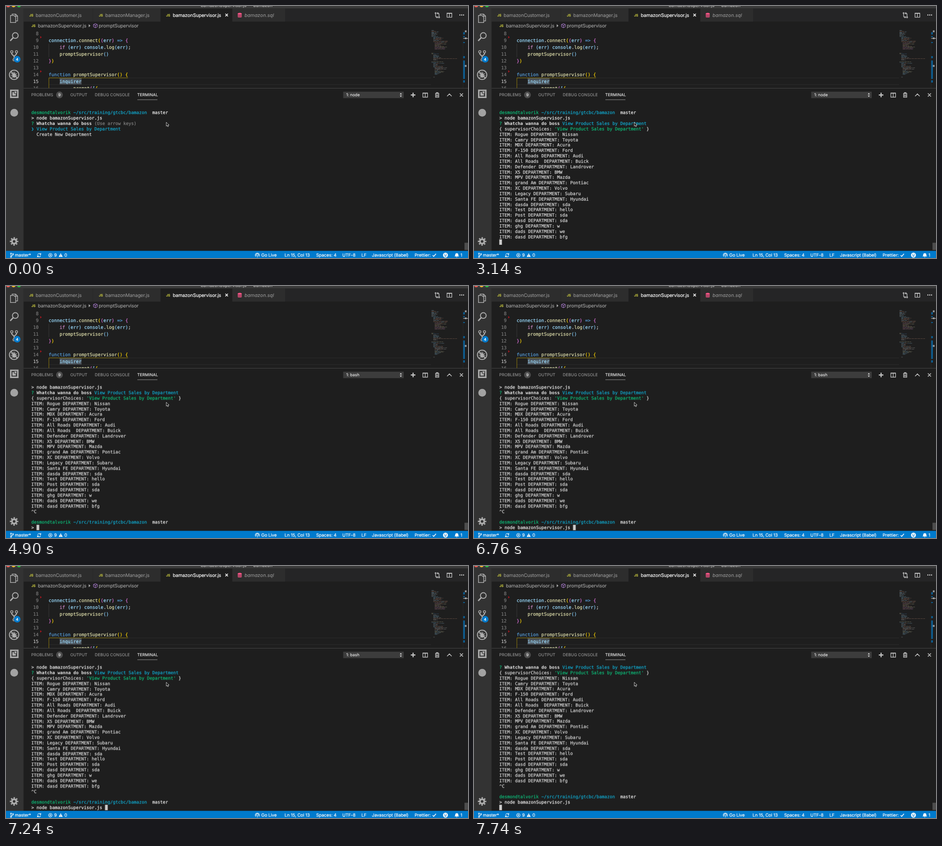
Write an HTML page that moves like this. It is 1013 px wide and 553 px high and loops after 8 s.

```html
<!DOCTYPE html>
<html lang="en">
<head>
<meta charset="utf-8">
<title>Terminal session</title>
<style>
html, body { margin: 0; width: 100%; height: 100%; overflow: hidden; background: #1e1e1e; }
svg { display: block; width: 100vw; height: 100vh; }
text { white-space: pre; text-rendering: geometricPrecision; color: #ccc; stroke-width: .1px; }
text, tspan { fill: currentColor; stroke: currentColor; }
.ui text { font: 10.4px Inter, "Liberation Sans", sans-serif; letter-spacing: -.14px; }
.ui .dim { color: #969696; }
.ui .on { color: #fff; stroke-width: .2px; }
.ui .crumb { color: #a9a9a9; }
.ui .js { font-size: 7.3px; font-weight: 700; color: #cbcb41; letter-spacing: 0; }
.ui .panel text { font-size: 8.8px; letter-spacing: .1px; color: #979797; }
.ui .panel .on { color: #e7e7e7; }
.ui .panel .pick { color: #f0f0f0; letter-spacing: 0; }
.ui .status text { font-size: 9.6px; letter-spacing: -.07px; color: #fff; stroke-width: .2px; }
.code text { font: 9.97px "DejaVu Sans Mono", "Liberation Mono", monospace; color: #d4d4d4; stroke-width: .25px; }
.code .num { color: #858585; text-anchor: end; stroke-width: .1px; }
.code .now { color: #d0d0d0; }
.code .v { color: #9cdcfe; } .code .f { color: #dcdcaa; } .code .k { color: #569cd6; }
.code .c { color: #c586c0; } .code .y { color: #ffd700; } .code .p { color: #da70d6; } .code .b { color: #87cefa; }
.term text { font: 9.595px "DejaVu Sans Mono", "Liberation Mono", monospace; color: #d8d8d8; stroke-width: .25px; }
.term .w { color: #f0f0f0; } .term .g { color: #0dbc79; } .term .c { color: #11a8cd; } .term .d { color: #808080; }
.term .h { color: #e5e5e5; font-weight: 700; stroke-width: 0; }
.line { fill: none; stroke: #adadad; stroke-width: 1.5; }
.thin { fill: none; stroke: #c5c5c5; stroke-width: 1.1; }
.white { fill: none; stroke: #fff; stroke-width: 1.1; }

#menu, #list, #after, #typed, #node, #bash, #scroll, #cursor { animation: 8s step-end infinite; }
#menu { animation-name: menu; }
#list { animation-name: list; }
#after { animation-name: after; }
#typed { animation-name: typed; }
#node { animation-name: node; }
#bash { animation-name: bash; }
#scroll { animation-name: scroll; }
#cursor { animation-name: cursor; }
@keyframes menu { 0% { opacity: 1 } 6.25%, 100% { opacity: 0 } }
@keyframes list { 0% { opacity: 0 } 6.25%, 100% { opacity: 1 } }
@keyframes after { 0% { opacity: 0 } 61.25%, 100% { opacity: 1 } }
@keyframes typed { 0% { opacity: 0 } 84.5%, 100% { opacity: 1 } }
@keyframes node { 0% { opacity: 1 } 61.25% { opacity: 0 } 96.75%, 100% { opacity: 1 } }
@keyframes bash { 0% { opacity: 0 } 61.25% { opacity: 1 } 96.75%, 100% { opacity: 0 } }
@keyframes scroll {
  0% { transform: translateY(0) }
  61.25% { transform: translateY(-23.68px) }
  94.5%, 100% { transform: translateY(-35.52px) }
}
@keyframes cursor {
  0% { opacity: 0; transform: translate(0, 0) }
  6.25% { opacity: 1; transform: translate(0, 0) }
  61.25% { opacity: 1; transform: translate(11.55px, 11.84px) }
  84.5% { opacity: 1; transform: translate(161.7px, 11.84px) }
  94.5%, 100% { opacity: 1; transform: translate(0, 11.84px) }
}
</style>
</head>
<body>
<svg viewBox="0 0 1013 553" preserveAspectRatio="none">
  <defs>
    <clipPath id="editorClip"><rect x="38" y="51" width="975" height="129"/></clipPath>
    <clipPath id="termClip"><rect x="38" y="216" width="975" height="321"/></clipPath>
  </defs>
  <rect width="1013" height="553" fill="#1e1e1e"/>

  <g class="ui">
    <!-- title bar and tabs -->
    <rect width="1013" height="5.6" fill="#3a3a3a"/>
    <circle cx="4.8" cy="-2" r="4.7" fill="#ff5f57"/>
    <circle cx="16.6" cy="-2" r="4.7" fill="#febc2e"/>
    <circle cx="28.4" cy="-2" r="4.7" fill="#28c840"/>
    <text x="505.5" y="2.4" text-anchor="middle" style="font-size:9.6px;letter-spacing:0">bamazonSupervisor.js — bamazon</text>
    <rect x="38.4" y="5.6" width="974.6" height="28.6" fill="#252526"/>
    <path d="M38.4 5.6H190V34.2H38.4ZM190.8 5.6H338.6V34.2H190.8ZM496.4 5.6H612V34.2H496.4Z" fill="#2d2d2d"/>
    <path d="M339 5.6H496V34.4H339Z" fill="#1e1e1e"/>
    <text class="js" x="51" y="22.6">JS</text><text class="dim" x="65" y="23.6">bamazonCustomer.js</text>
    <text class="js" x="203.5" y="22.6">JS</text><text class="dim" x="217.8" y="23.6">bamazonManager.js</text>
    <text class="js" x="351" y="22.6">JS</text><text class="on" x="365.7" y="23.6">bamazonSupervisor.js</text>
    <path d="M481 17l5.6 5.6m0-5.6l-5.6 5.6" class="white" style="stroke-width:1.5"/>
    <path d="M508 16.5q4.5-2.8 9 0v2q-4.5 2-9 0zM508 19.6q4.5 2 9 0v1.9q-4.5 2-9 0zM508 22.6q4.5 2 9 0v1.3q-4.5 2.4-9 0z" fill="#f55385"/>
    <text class="dim" x="523" y="23.6" style="font-style:italic;letter-spacing:.1px">bamazon.sql</text>
    <g class="thin" style="stroke-width:1.3">
      <path d="M942 17v5.5q0 2 2 2h1.6M944.5 22.6l2 2-2 2M949.5 23.5V18q0-2-2-2H946M947.4 14l-2 2 2 2"/>
      <circle cx="942" cy="15.6" r="1.3"/><circle cx="949.5" cy="24.7" r="1.3"/>
      <path d="M967 15.6h10.5v9H967zM972.2 15.6v9M967 16.3h10.5"/>
    </g>
    <path d="M994 18.6h2.3v2.3H994zM998 18.6h2.3v2.3H998zM1002 18.6h2.3v2.3H1002z" fill="#c5c5c5"/>

    <!-- breadcrumbs -->
    <text class="js" x="55.8" y="45.7">JS</text>
    <text class="crumb" x="70" y="46.8">bamazonSupervisor.js</text>
    <path d="M181.4 40l3.8 3.2-3.8 3.2z" fill="#a9a9a9"/>
    <path d="M196 38.6l4.2 2v5l-4.2 2.2-4.2-2.2v-5zM191.8 40.6l4.2 2 4.2-2M196 42.6v5" fill="none" stroke="#b180d7"/>
    <text class="crumb" x="203.2" y="46.8" style="letter-spacing:-.06px">promptSupervisor</text>

    <!-- activity bar -->
    <rect y="5.6" width="38.5" height="532" fill="#333"/>
    <g class="line">
      <path d="M13.5 20.6v-2.8h7.6l4.3 4.3v10.6h-4M20.8 18v4.4h4.4"/>
      <path d="M9.8 20.8h7.6l3.9 4v11.4H9.8z"/>
      <circle cx="20.4" cy="64.8" r="6.3" style="stroke-width:2"/><path d="M15.8 69.6l-6.6 6.8" style="stroke-width:2.8"/>
      <circle cx="12.7" cy="100.4" r="2.5"/><circle cx="23" cy="100.4" r="2.5"/><circle cx="17.8" cy="118" r="2.5"/>
      <path d="M12.7 103v2.6l5.1 4.8 5.2-4.8V103M17.8 110v5.4" style="stroke-width:2.2"/>
      <circle cx="17.8" cy="151" r="10.3" style="stroke-width:2"/>
      <ellipse cx="17.8" cy="152" rx="3.2" ry="4.6" fill="#adadad"/>
      <path d="M15.4 146.5q2.4-3 4.8 0M11.4 148l3 2M24.2 148l-3 2M10.8 152.6h4M24.8 152.6h-4M11.8 157.4l3-2M23.8 157.4l-3-2" style="stroke-width:1.2"/>
      <path d="M10.6 143.8l14.4 14.4" style="stroke-width:2.2"/>
      <path d="M10.5 185h15.4v15.4H10.5z" style="stroke-width:3.2"/>
      <path d="M14 189h3.6v3.6h4v4.2H14zM18.8 187.6h4v4h-4z" fill="#adadad" stroke="none"/>
      <circle cx="17.8" cy="516.6" r="4.8" style="stroke-width:3.8"/>
      <circle cx="17.8" cy="516.6" r="7.8" style="stroke-width:3;stroke-dasharray:3.06 3.066;stroke-dashoffset:1.53"/>
    </g>
    <circle cx="18" cy="234.3" r="8.5" fill="#a3a3a3"/>
    <circle cx="24.5" cy="116.8" r="7.3" fill="#007acc"/>
    <text class="on" x="24.5" y="119.7" text-anchor="middle" style="font-size:8px;font-weight:600;letter-spacing:0">4</text>
  </g>

  <!-- editor -->
  <g class="code" clip-path="url(#editorClip)">
    <path d="M94 157.8H932M94 172.4H932" stroke="#2e2e2e" stroke-width=".9"/>
    <rect x="117.5" y="158.4" width="48.2" height="13.8" fill="#4b5259"/>
    <path d="M94 82.5v30" stroke="#404040" stroke-width=".8"/>
    <path d="M94 180V157.8H267.4" fill="none" stroke="#ffd700" stroke-opacity=".6" stroke-width=".9"/>
    <path d="M75 66l3.4 2.6L75 71.2zM75 141l3.4 2.6-3.4 2.6z" fill="#a8171f"/>
    <g id="lines"></g>
    <g id="minimap"></g>
    <path d="M1002.2 51V180" stroke="#333" stroke-width=".6"/>
    <path d="M1002.5 57.5h3.6v5h-3.6zM1002.5 66h3.6v2.6h-3.6zM1002.5 79h3.6v2.2h-3.6zM1002.5 110h3.6v4.4h-3.6zM1002.5 119.5h3.6V160h-3.6zM1002.5 163h3.6v5h-3.6z" fill="#0c5f94"/>
    <path d="M1006 53.4h4v4h-4zM1006 69h4v3.8h-4zM1006 129.4h4v4h-4z" fill="#8f9296"/>
    <path d="M1002.5 71.2H1013" stroke="#b4b4b4" stroke-width="1.2"/>
  </g>

  <!-- panel -->
  <path d="M38.5 180.5H1013" stroke="#444"/>
  <g class="ui"><g class="panel">
    <text x="55.2" y="198.2">PROBLEMS</text>
    <circle cx="117.2" cy="195" r="7.4" fill="#4d4d4d"/>
    <text class="on" x="117.2" y="198.1" text-anchor="middle">9</text>
    <text x="141" y="198.2">OUTPUT</text>
    <text x="194.8" y="198.2">DEBUG CONSOLE</text>
    <text class="on" x="287.8" y="198.2">TERMINAL</text>
    <path d="M288 205.7H332" stroke="#a0a0a0" stroke-width=".9"/>
    <rect x="739.4" y="188" width="132.6" height="14.2" fill="#3c3c3c"/>
    <text class="pick" id="node" x="746" y="198.4">1: node</text>
    <text class="pick" id="bash" x="746" y="198.4">1: bash</text>
    <path d="M863.4 194l2.3-3 2.3 3zM863.4 196.4l2.3 3 2.3-3z" fill="#e8e8e8"/>
    <path d="M887.6 195.2h10M892.6 190.2v10" class="thin" style="stroke-width:2.4"/>
    <path d="M914 190.8h10.4v9.2H914zM919.2 190.8v9.2M914 191.5h10.4" class="thin" style="stroke-width:1.3"/>
    <path d="M941 192h8.8M943.6 191.6v-1.4h3.6v1.4M942 193v7.4h6.8V193M944.2 194v5M946.6 194v5" class="thin" style="stroke-width:1.4"/>
    <path d="M967.2 198l5-5 5 5M995.2 191.8l6.8 6.8m0-6.8l-6.8 6.8" class="thin" style="stroke-width:1.6"/>
  </g></g>

  <g class="term" clip-path="url(#termClip)">
    <g id="scroll">
      <g id="shared"></g>
      <g id="menu"></g>
      <g id="list"></g>
      <g id="after"></g>
      <g id="typed"></g>
    </g>
    <rect id="cursor" x="55.4" y="512.2" width="5.9" height="11.8" fill="#ccc"/>
    <rect x="1005.3" y="519.5" width="7.7" height="16" fill="#4d4d4d"/>
    <path d="M351.4 255v8.7l2-1.8 1.3 3 1.5-.7-1.3-2.9h2.7z" fill="#111" stroke="#eee" stroke-width=".8"/>
  </g>

  <!-- status bar -->
  <g class="ui"><g class="status">
    <rect y="537.3" width="1013" height="15.7" fill="#007acc"/>
    <g class="white">
      <circle cx="11" cy="543.3" r="1.2"/><circle cx="11" cy="550.4" r="1.2"/><circle cx="15.4" cy="544.6" r="1.2"/>
      <path d="M11 544.5v4.7M15.4 545.8q0 2-4.2 2.6"/>
      <path d="M69.4 546.2a3.5 3.5 0 0 1 6.4-1.5M75.9 547.4a3.5 3.5 0 0 1-6.4 1.5M76.4 542.4v2.8h-2.8M68.9 551.2v-2.8h2.8"/>
      <circle cx="97.2" cy="546.8" r="3.8"/><path d="M95.6 545.2l3.2 3.2m0-3.2l-3.2 3.2"/>
      <path d="M547.9 549.9a4.6 4.6 0 1 1 6.4 0M549.4 548a2.5 2.5 0 1 1 3.4 0M551.1 546.4v5.2"/>
      <path d="M935.4 547l2.4 2.5 5-5.8" style="stroke-width:1.7"/>
    </g>
    <path d="M120 542.4l4.4 8.2h-8.8z" fill="#fff"/>
    <path d="M120 545v2.8M120 548.7v1" stroke="#007acc"/>
    <circle cx="963.6" cy="546.6" r="5.4" fill="#fff"/>
    <path d="M960.6 547.6q3 4.4 6 0z" fill="#007acc"/>
    <circle cx="961.8" cy="545" r=".9" fill="#007acc"/><circle cx="965.4" cy="545" r=".9" fill="#007acc"/>
    <path d="M983.4 549.6q1.7-1.4 1.7-4.2 0-2.6 3.3-3.2 3.3.6 3.3 3.2 0 2.8 1.7 4.2zM986.9 550.2h3q-1.5 2.4-3 0z" fill="#fff"/>
    <text x="19.4" y="550.2">master*</text>
    <text x="105.4" y="550.2">9</text>
    <text x="128" y="550.2">0</text>
    <text x="559.8" y="550.2">Go Live</text>
    <text x="610.8" y="550.2">Ln 15, Col 13</text>
    <text x="680" y="550.2">Spaces: 4</text>
    <text x="737.4" y="550.2">UTF-8</text>
    <text x="779.3" y="550.2">LF</text>
    <text x="802.3" y="550.2" style="letter-spacing:-.11px">Javascript (Babel)</text>
    <text x="896" y="550.2">Prettier:</text>
    <text x="996.6" y="550.2">1</text>
  </g></g>
</svg>
<script>
const NS = "http://www.w3.org/2000/svg";
const byId = id => document.getElementById(id);

function add(parent, tag, attrs, html = "") {
  const el = document.createElementNS(NS, tag);
  for (const key in attrs) el.setAttribute(key, attrs[key]);
  el.innerHTML = html;
  parent.appendChild(el);
}

// "[c|text]" becomes a tspan of class c
const mark = s => s.replace(/\[(\w)\|([^\]]*)\]/g, '<tspan class="$1">$2</tspan>');

const code = [
  "",
  "[v|connection].[f|connect][y|(][p|(][v|err][p|)] [k|=>] [p|{]",
  "    [c|if] [b|(][v|err][b|)] [v|console].[f|log][b|(][v|err][b|)];",
  "    [f|promptSupervisor][b|()]",
  "[p|}][y|)]",
  "",
  "[k|function] [f|promptSupervisor][y|()] [y|{]",
  "    [v|inquirer]",
  "        .[f|prompt][p|(][b|&#91;][y|{]"
];
code.forEach((line, i) => {
  const y = 63.6 + 15 * i, n = i + 8;
  add(byId("lines"), "text", { x: 71.6, y, class: n === 15 ? "num now" : "num" }, n);
  add(byId("lines"), "text", { x: 93.5, y }, mark(line));
});

const row = (id, r, line) =>
  add(byId(id), "text", { x: 55.4, y: (225.5 + 11.84 * r).toFixed(2) }, mark(line));

const prompt = "[g|desmondtalvorik] [c|~/src/training/gtcbc/bamazon]  [w|master]";
const command = "node bamazonSupervisor.js";
const question = "[g|?] [h|Whatcha wanna do boss] ";
const choice = "View Product Sales by Department";

row("shared", 1, prompt);
row("shared", 2, `[w|> ${command}]`);
row("menu", 3, question + "[d|(Use arrow keys)]");
row("menu", 4, `[c|❯ ${choice}]`);
row("menu", 5, "  Create New Department");

const items = `Rogue/Nissan,Camry/Toyota,MDX/Acura,F-150/Ford,All Roads/Audi,All Roads /Buick,
Defender/Landrover,X5/BMW,MPV/Mazda,grand Am/Pontiac,XC/Volvo,Legacy/Subaru,Santa FE/Hyundai,
dasda/sda,Test/hello,Post/sda,dasd/sda,ghg/w,dads/we,dasd/bfg`.replace(/\n/g, "").split(",");
row("list", 3, `${question}[c|${choice}]`);
row("list", 4, `{ supervisorChoices: [g|'${choice}'] }`);
items.forEach((item, i) => {
  const [name, dept] = item.split("/");
  row("list", 5 + i, `ITEM: ${name} DEPARTMENT: ${dept}`);
});

row("after", 25, "^C");
row("after", 27, prompt);
row("after", 28, "[w|>]");
row("typed", 28, `  [w|${command}]`);

// minimap: y, rows, x, widest row, colours
let seed = 7;
const rand = () => (seed = seed * 16807 % 2147483647) / 2147483647;
const blocks = [
  [53, 4, 933, 20, "#9cdcfe #ce9178"], [58.6, 6, 933, 15, "#9cdcfe #d4d4d4"],
  [68.5, 7, 937, 34, "#ce9178 #9cdcfe"], [80, 10, 940, 28, "#c586c0 #dcdcaa #ce9178"],
  [103, 2, 933, 16, "#569cd6 #dcdcaa"], [107, 5, 937, 18, "#9cdcfe #d4d4d4"],
  [115, 1, 937, 52, "#ce9178"], [116.6, 2, 937, 12, "#d4d4d4"],
  [122, 2, 933, 30, "#569cd6 #dcdcaa"], [125.4, 6, 937, 26, "#9cdcfe #ce9178"],
  [135, 4, 940, 32, "#ce9178 #d4d4d4"], [141.6, 6, 940, 24, "#9cdcfe #dcdcaa"],
  [155.6, 1, 937, 3, "#d4d4d4"]
];
for (const [y, rows, x, widest, tones] of blocks) {
  const palette = tones.split(" ");
  for (let r = 0; r < rows; r++) {
    const end = x + widest * (rows > 1 ? .25 + .75 * rand() : 1);
    for (let at = x; at < end;) {
      const width = Math.min(2 + 5 * rand(), end - at);
      const fill = palette[Math.floor(rand() * palette.length)];
      add(byId("minimap"), "rect", { x: at, y: y + 1.6 * r, width, height: .8, fill, opacity: .4 });
      at += width + 1;
    }
  }
}
</script>
</body>
</html>
```
